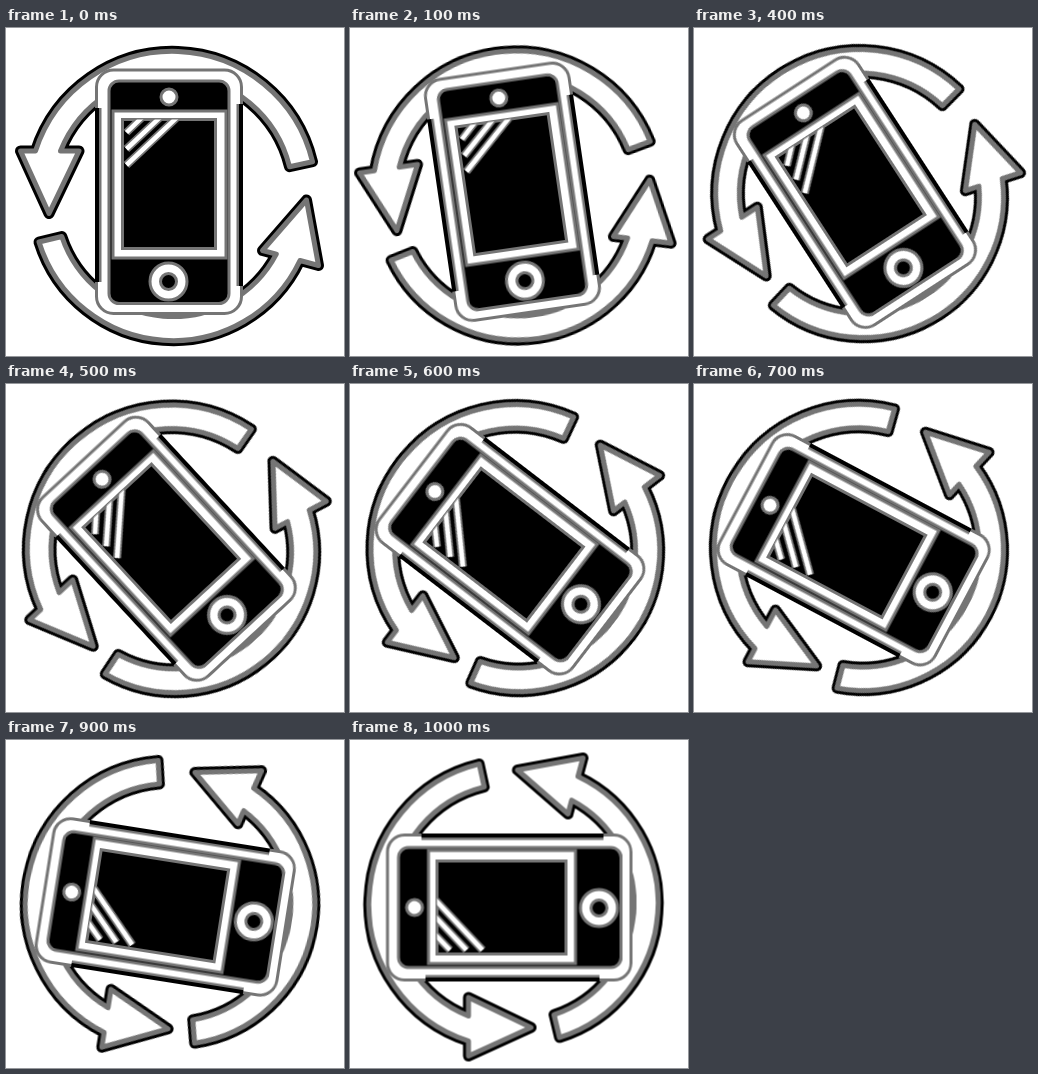
Write an HTML page that moves like this. It is 338 px wide and 328 px high and loops after 1.7 s.

```html
<!DOCTYPE html>
<html lang="en">
<head>
<meta charset="utf-8">
<title>Rotate device</title>
<style>
  html, body { margin: 0; width: 100%; height: 100%; overflow: hidden; background: #fff; }
  svg { display: block; width: 100%; height: 100%; }

  #device {
    transform-origin: 163px 167.5px;
    animation: turn 1700ms step-end infinite;
  }
  /* one pose every 100 ms, then a long hold */
  @keyframes turn {
    0%      { transform: rotate(0deg); }
    5.882%  { transform: rotate(-8.3deg); }
    11.764% { transform: rotate(-16.7deg); }
    17.647% { transform: rotate(-25deg); }
    23.529% { transform: rotate(-33deg); }
    29.411% { transform: rotate(-42.8deg); }
    35.294% { transform: rotate(-52.5deg); }
    41.176% { transform: rotate(-62deg); }
    47.058% { transform: rotate(-72deg); }
    52.941% { transform: rotate(-81deg); }
    58.823%, 100% { transform: rotate(-90deg); }
  }

  .halo { fill: #000; stroke: #000; stroke-width: 11; stroke-linejoin: round; }
  .arrows { fill: #fff; stroke: #757575; stroke-width: 5; stroke-linejoin: round; }
  .phone { fill: #fff; stroke: #757575; stroke-width: 3; }
  .phone .dark { fill: #000; }
  .phone .edge { stroke: #000; stroke-width: 4; }
  .shade { fill: #757575; }
  .glare { fill: none; stroke: #757575; stroke-width: 8; }
  .glare + .glare { stroke: #fff; stroke-width: 4.5; }
</style>
</head>
<body>
<svg viewBox="0 0 338 328">
  <defs>
    <path id="over" d="M306.5 133.7A144 144 0 0 0 29.5 123H14.5L43 185.5L73 123H54.5A120.5 120.5 0 0 1 283.5 138.7Z"/>
    <path id="under" d="M33 214A140.5 140.5 0 0 0 294 232.5L312.5 237.5L300.5 172L256.5 222.5L270.3 226.2A117 117 0 0 1 55.8 208.5Z"/>
    <path id="stripes" d="M120.5 104.5L138 87.5M120.5 121L156 87.500M120.5 137L173 87.500"/>
    <clipPath id="glass"><rect x="117" y="91.500" width="93" height="129"/></clipPath>
  </defs>

  <g id="device">
    <g class="halo">
      <use href="#over"/>
      <use href="#under"/>
    </g>
    <rect class="shade" x="120" y="283" width="94" height="5"/>
    <g class="arrows">
      <use href="#over"/>
      <use href="#under"/>
    </g>
    <g class="phone">
      <rect x="90.500" y="42" width="145" height="243.500" rx="17"/>
      <!-- darker sides where the case leaves the ring -->
      <path d="M94 80V254M232 76V258"/>
      <path class="edge" d="M91 80V254M235 76V258"/>
      <rect class="dark" x="103" y="53" width="120" height="222.500" rx="10"/>
      <rect x="107" y="83" width="113" height="147"/>
      <rect class="dark" x="116.500" y="91.500" width="93" height="129"/>
      <circle cx="163" cy="69" r="8"/>
      <circle cx="162.500" cy="253.500" r="18.500"/>
      <circle class="dark" cx="162.500" cy="253.500" r="8"/>
    </g>
    <g clip-path="url(#glass)">
      <use href="#stripes" class="glare"/>
      <use href="#stripes" class="glare"/>
    </g>
  </g>
</svg>
</body>
</html>
```
